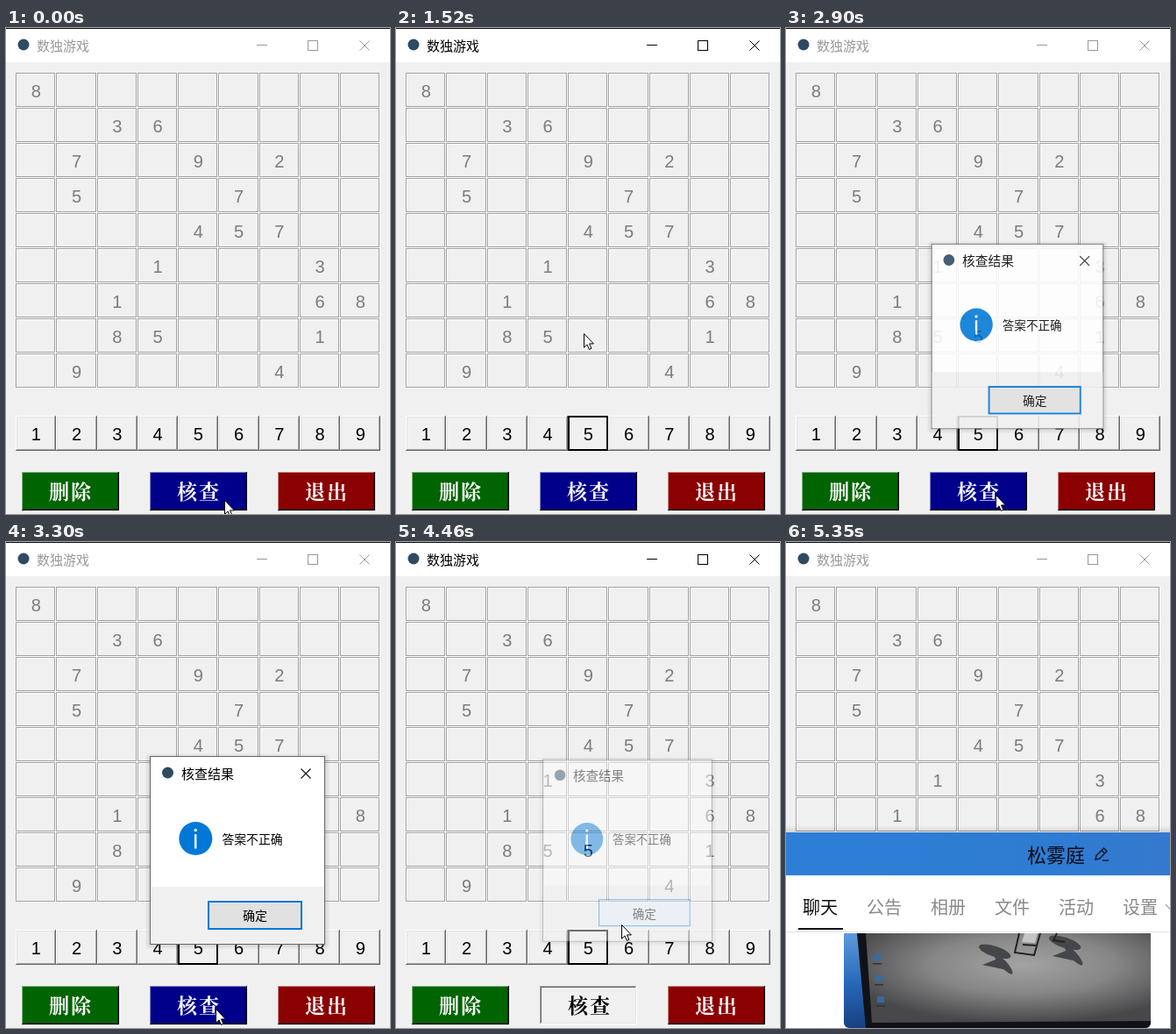
These frames come from a looping animation (438 by 554 pixels, 5390 ms). An HTML page:

```html
<!DOCTYPE html>
<html lang="zh-CN">
<head>
<meta charset="utf-8">
<title>数独游戏</title>
<style>
  html, body { margin: 0; width: 100%; height: 100%; overflow: hidden; background: #f0f0f0; }
  svg { display: block; }
  text { font-family: "Noto Sans CJK SC", "Noto Sans CJK", "Noto Sans CJK JP", sans-serif; }
  .num { font-family: "Liberation Sans", Arial, sans-serif; text-anchor: middle; }
  .song { font-family: "Noto Serif CJK SC", "Noto Sans CJK SC", "Noto Sans CJK", serif; font-weight: bold; }
  .crisp { shape-rendering: crispEdges; }
</style>
</head>
<body>
<svg id="stage" width="438" height="554" viewBox="0 0 438 554"></svg>
<script>
const LOOP = 5390, TICK = 46.5;
const FACE = '#f0f0f0', SHADE = '#a0a0a0';
const stage = document.getElementById('stage');

function add(parent, tag, attrs, content) {
  const el = document.createElementNS('http://www.w3.org/2000/svg', tag);
  for (const k in attrs) el.setAttribute(k, attrs[k]);
  if (content) el.textContent = content;
  parent.appendChild(el);
  return el;
}
const group = (parent, attrs) => add(parent, 'g', attrs);
const rect = (parent, x, y, width, height, fill, more) =>
  add(parent, 'rect', { x, y, width, height, fill, ...more });
const line = (parent, d, stroke, width = 1, more) =>
  add(parent, 'path', { d, stroke, 'stroke-width': width, fill: 'none', ...more });
const label = (parent, s, x, cy, size, fill, more) =>
  add(parent, 'text', { x, y: cy + size * 0.37, 'font-size': size, fill, ...more }, s);
const show = (el, on) => { el.style.display = on ? '' : 'none'; };

// Two nested one-pixel edges: [top-left, bottom-right] outside, then inside.
function bevel(parent, x, y, w, h, fill, outer, inner) {
  const g = group(parent, { class: 'crisp' });
  rect(g, x, y, w, h, fill);
  [outer, inner].forEach(([tl, br], i) => {
    const l = x + i, t = y + i, iw = w - 2 * i, ih = h - 2 * i;
    rect(g, l, t, iw, 1, tl);
    rect(g, l, t, 1, ih, tl);
    rect(g, l, t + ih - 1, iw, 1, br);
    rect(g, l + iw - 1, t, 1, ih, br);
  });
  return g;
}
const groove = (p, x, y, w, h) => bevel(p, x, y, w, h, FACE, [SHADE, '#fff'], ['#fff', SHADE]);
const raised = (p, x, y, w, h) => bevel(p, x, y, w, h, FACE, ['#fff', '#696969'], ['#e3e3e3', SHADE]);
const sunken = (p, x, y, w, h) => bevel(p, x, y, w, h, FACE, [SHADE, '#fff'], ['#696969', '#e3e3e3']);

const KEY_Y = 442, CELL_H = 40;
const colX = c => Math.round(11 + c * 46.25);
const colW = c => colX(c + 1) - colX(c);
const midX = c => 34.3 + c * 46.25;
const rowY = r => 51 + r * CELL_H;
const digit = (s, c, top, fill) =>
  label(stage, s, midX(c), top + 20.7, 20, fill, { class: 'num' });

// Window
rect(stage, 0, 0, 438, 554, FACE);
rect(stage, 0, 0, 438, 39, '#fff');
rect(stage, 0, 0, 438, 1, '#111');
add(stage, 'circle', { cx: 20, cy: 19, r: 6.5, fill: '#2f4a63' });
const title = label(stage, '数独游戏', 35, 20, 15, '#000');
const controls = group(stage, { fill: 'none' });
add(controls, 'path', { d: 'M286 19.5H298M344.5 14.5H355.5V25.5H344.5Z', class: 'crisp' });
add(controls, 'path', { d: 'M403.5 14.5L414.5 25.5M414.5 14.5L403.5 25.5' });

// Board
const givens = ['8........', '..36.....', '.7..9.2..', '.5...7...', '....457..',
  '...1...3.', '..1....68', '..85...1.', '.9....4..'];
givens.forEach((row, r) => [...row].forEach((d, c) => {
  groove(stage, colX(c), rowY(r), colW(c), CELL_H);
  if (d !== '.') digit(d, c, rowY(r), '#7c7c7c');
}));
const cellDown = sunken(stage, colX(4), rowY(7), colW(4), CELL_H);
const answer = digit('5', 4, rowY(7), '#000');

// Number keys
for (let c = 0; c < 9; c++) raised(stage, colX(c), KEY_Y, colW(c), CELL_H);
const keyDown = sunken(stage, colX(4), KEY_Y, colW(4), CELL_H);
const keyRing = rect(stage, colX(4) + 1, KEY_Y + 1, colW(4) - 2, CELL_H - 2, 'none',
  { stroke: '#000', 'stroke-width': 2, class: 'crisp' });
for (let c = 0; c < 9; c++) digit(c + 1, c, KEY_Y, '#000');

// Action buttons
const caption = (parent, s, x, fill) =>
  label(parent, s, x + 31, 528.5, 23, fill, { class: 'song', 'letter-spacing': 2 });
function action(x, s, fill, light, dark) {
  bevel(stage, x, 506, 111, 44, fill, [light, '#000'], [fill, dark]);
  caption(stage, s, x, '#fff');
}
action(18, '删除', '#006400', '#7fb17f', '#003c00');
action(164, '核查', '#00008b', '#7f7fc5', '#000053');
action(310, '退出', '#8b0000', '#c57f7f', '#530000');
const checkDown = group(stage);
sunken(checkDown, 164, 506, 111, 44);
caption(checkDown, '核查', 165, '#000');

// Result dialog
const dialog = group(stage);
for (let i = 1; i < 6; i++)
  rect(dialog, 164 - i, 246 - i, 200 + 2 * i, 213 + 2 * i, '#000', { opacity: 0.022, rx: i });
rect(dialog, 164.5, 244.5, 199, 214, '#fff', { stroke: '#666' });
rect(dialog, 165, 393, 198, 65, FACE);
add(dialog, 'circle', { cx: 184.5, cy: 263, r: 6.5, fill: '#2f4a63' });
label(dialog, '核查结果', 200, 264, 15, '#000');
const dialogClose = line(dialog, 'M336.5 258.5L347.5 269.5M347.5 258.5L336.5 269.5', '#111', 1.1);
add(dialog, 'circle', { cx: 216.3, cy: 338, r: 19, fill: '#0078d7' });
rect(dialog, 215, 333, 2.4, 16.5, '#fff');
add(dialog, 'circle', { cx: 216.2, cy: 328.5, r: 1.7, fill: '#fff' });
label(dialog, '答案不正确', 246.5, 338.5, 13.8, '#000');
const okFocus = rect(dialog, 231, 410, 106, 31, '#e1e1e1', { stroke: '#0078d7', 'stroke-width': 2 });
const okHover = rect(dialog, 230.5, 409.5, 107, 31, '#e5f1fb', { stroke: '#0078d7' });
label(dialog, '确定', 270, 426, 14, '#000');

// Pointer
const pointer = add(stage, 'path', {
  d: 'M.5 .5V16.2L4 12.9 6.4 18.4 8.9 17.3 6.5 11.9H11.4Z',
  fill: '#fff', stroke: '#000', 'stroke-linejoin': 'round'
});

// Chat window
const chat = group(stage);
const defs = add(chat, 'defs');
function gradient(id, tag, attrs, stops) {
  const g = add(defs, tag, { id, ...attrs });
  stops.forEach(([offset, color, alpha = 1]) =>
    add(g, 'stop', { offset, 'stop-color': color, 'stop-opacity': alpha }));
}
gradient('fall', 'linearGradient', { x2: 0, y2: 1 }, [[0, '#000', 0], [1, '#000', 0.12]]);
gradient('band', 'linearGradient', {}, [[0, '#2d7fd6'], [0.7, '#2e7cd2'], [1, '#3579ce']]);
gradient('desk', 'linearGradient', { x2: 0.3, y2: 1 }, [[0, '#5d9bdc'], [0.5, '#2767b8'], [1, '#153a78']]);
gradient('screen', 'radialGradient', { cx: 0.55, cy: 0.35, r: 0.65 },
  [[0, '#a3a3a3'], [0.5, '#868686'], [1, '#48484b']]);
add(add(defs, 'clipPath', { id: 'frame' }), 'rect', { x: 66, y: 430, width: 350, height: 124, rx: 6 });

rect(chat, 0, 323, 438, 8, 'url(#fall)');
rect(chat, 0, 331, 438, 49, 'url(#band)');
rect(chat, 0, 380, 438, 174, '#fff');
label(chat, '松雾庭', 275, 357, 22, '#0a0a14');
line(chat, 'M353 362L354 357.5 362.5 349 366 352.5 357.5 361ZM360 351.5L363.5 355M361 363H368', '#10182a', 1.5);

const photo = group(chat, { 'clip-path': 'url(#frame)' });
rect(photo, 66, 446, 350, 108, 'url(#desk)');
add(photo, 'path', { d: 'M81 446H416V554H91Z', fill: '#111217' });
add(photo, 'path', { d: 'M91 446H416V546L98 548Z', fill: 'url(#screen)' });
[[104, 475], [106, 499], [108, 523]].forEach(([x, y]) => {
  rect(photo, x - 4, y - 5, 8, 7, '#386a9e');
  rect(photo, x - 5, y + 5, 10, 1.5, '#303238');
});
[[242, 468], [322, 458]].forEach(([x, y]) => {
  const g = group(photo, { transform: `translate(${x} ${y})`, fill: '#45464a' });
  add(g, 'ellipse', { cx: -4, cy: 0, rx: 19, ry: 6, transform: 'rotate(18)' });
  add(g, 'ellipse', { cx: 6, cy: 13, rx: 15, ry: 4, transform: 'rotate(48 6 13)' });
  add(g, 'path', { d: 'M-18 14L2 6 10 20Z' });
});
line(photo, 'M266 446L261 468 283 471 290 446M270 459L287 460M309 446L305 454 318 456', '#222', 2);
add(photo, 'path', { d: 'M272 446H287L284 457 269 456Z', fill: '#c4c4c4' });

['聊天', '公告', '相册', '文件', '活动', '设置'].forEach((s, i) =>
  label(chat, s, 19 + i * 73, 417, 20, i ? '#888' : '#111'));
line(chat, 'M433 413L437.5 418 442 413', '#aaa', 1.2);
rect(chat, 14, 440, 51, 2, '#111');
rect(chat, 0, 444, 438, 1, '#e4e4e4');

// Pointer path: time, x, y
const path = [
  [0, 249, 538], [90, 249, 538], [280, 235, 495], [400, 217, 467], [540, 220, 468],
  [580, 226, 468], [810, 175, 421], [895, 175, 421], [960, 170, 411], [1070, 184, 393],
  [1250, 205, 362], [1400, 214, 348], [1740, 215, 349], [1980, 258, 466], [2135, 237, 522],
  [2240, 237, 522], [2400, 239, 532], [3280, 239, 532], [3430, 241, 491], [3680, 253, 437],
  [3980, 253, 437], [4200, 257, 436], [4510, 257, 436], [4820, 404, 556]
];
// Dialog: time, opacity, scale
const fade = [
  [0, 0, 1], [2855, 0.45, 0.96], [2895, 0.87, 0.983], [2945, 1, 1],
  [4365, 0.9, 0.99], [4410, 0.7, 0.98], [4455, 0.46, 0.968], [4505, 0.2, 0.95], [4550, 0, 1]
];

function pointerAt(t) {
  const i = path.findIndex(p => p[0] > t);
  if (i < 0) return path[path.length - 1].slice(1);
  const [t0, x0, y0] = path[i - 1], [t1, x1, y1] = path[i];
  const k = (t - t0) / (t1 - t0);
  return [x0 + (x1 - x0) * k, y0 + (y1 - y0) * k].map(Math.round);
}

function draw(t) {
  const within = (a, b) => t >= a && t < b;
  const active = within(310, 2765) || within(4365, 5255);
  title.setAttribute('fill', active ? '#000' : '#999');
  controls.setAttribute('stroke', active ? '#000' : '#999');

  show(keyDown, within(400, 490));
  show(keyRing, within(400, 5255));
  show(cellDown, within(1660, 1745));
  show(answer, within(1700, 5255));
  show(checkDown, within(2480, 2620) || within(4410, 4600));

  const [, alpha, scale] = fade.filter(f => f[0] <= t).pop();
  dialog.setAttribute('opacity', alpha);
  dialog.setAttribute('transform', `translate(264 351) scale(${scale}) translate(-264 -351)`);
  show(dialog, alpha > 0);
  show(dialogClose, t < 4365);
  show(okFocus, t < 3660);
  show(okHover, t >= 3660);

  const [x, y] = pointerAt(Math.floor(t / TICK) * TICK);
  pointer.setAttribute('transform', `translate(${x} ${y})`);
  show(pointer, t < 4820);
  show(chat, t >= 5300);
}

const start = performance.now();
function tick() {
  draw((performance.now() - start) % LOOP);
  requestAnimationFrame(tick);
}
draw(0);
requestAnimationFrame(tick);
</script>
</body>
</html>
```
